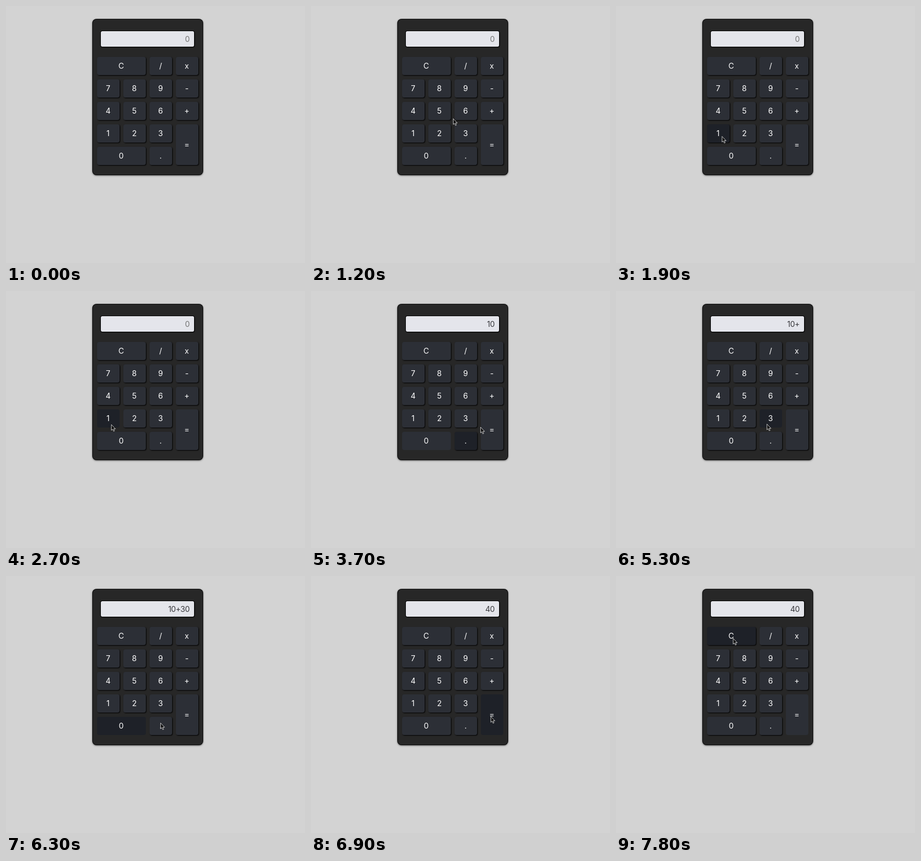
These frames come from a looping animation (558 by 480 pixels, 8000 ms). An HTML page:

```html
<!DOCTYPE html>
<html lang="en">
<head>
<meta charset="utf-8">
<title>Calculator</title>
<style>
html, body { margin: 0; width: 100%; height: 100%; overflow: hidden; background: #d3d3d3; }
body { position: relative; font: 14.3px Inter, Roboto, sans-serif; }
body * { position: absolute; box-sizing: border-box; }
#case { left: 162px; top: 25px; width: 204.5px; height: 290px; border-radius: 7px;
  background: #272727; box-shadow: 0 0 0 1px #0a0a0a, 0 1px 3px 1px #0008; }
#display { left: 177px; top: 47px; width: 174px; height: 29px; padding-right: 8.4px; border-radius: 3px;
  background: #e4e5eb; line-height: 29.5px; text-align: right; letter-spacing: -.4px;
  box-shadow: 0 0 0 1px #000, 1px 1px 2px #000; }
.key { width: 42px; height: 34px; padding-bottom: 1px; border-radius: 4px; color: #fff;
  display: flex; align-items: center; justify-content: center; }
#pointer { left: 0; top: 0; width: 12px; height: 16px; overflow: visible; }
</style>
</head>
<body>
<div id="case"></div>
<div id="display"></div>
<svg id="pointer"><path d="M.7 .5V11.2L3 9.1L4.8 13L6.5 12.3L4.9 8.5H8.2Z" fill="#111" stroke="#eee" stroke-width=".8"/></svg>
<script>
const LOOP = 8000, STEP = 100, LEFT = 169.5, TOP = 95, COL = 49, ROW = 42;
const display = document.getElementById("display");
const pointer = document.getElementById("pointer");

// A repeated character widens its key; "=" also spans two rows.
const layout = ["CC/x", "789-", "456+", "123=", "00."];
const keys = layout.flatMap((line, row) => [...new Set(line)].map(label => {
  const el = document.createElement("div");
  const x = LEFT + COL * line.indexOf(label), y = TOP + ROW * row;
  const w = COL * (line.split(label).length - 1) - 7;
  const h = ROW * (label === "=" ? 2 : 1) - 8;
  el.className = "key";
  el.textContent = label;
  Object.assign(el.style, { left: x + "px", top: y + "px", width: w + "px", height: h + "px" });
  document.body.insertBefore(el, pointer);
  return { el, label, x, y, w, h };
}));

// The pointer rests between curved moves, each bending towards a control point.
const entry = [415, 402], enter = 600;
const moves = [
  { start: enter, end: 1500, bend: [293, 141], to: [199, 231] },
  { start: 1700, end: 2000, bend: [198, 240], to: [196, 249] },
  { start: 2800, end: 3100, bend: [213, 266], to: [230, 284] },
  { start: 3300, end: 4100, bend: [348, 266], to: [337, 199] },
  { start: 4500, end: 5300, bend: [275, 272], to: [281, 248] },
  { start: 5600, end: 5900, bend: [255, 266], to: [230, 284] },
  { start: 6100, end: 6500, bend: [293, 275], to: [335, 262] },
  { start: 7300, end: 7800, bend: [208, 80], to: [218, 116] }
];
const presses = [["1", 2600], ["0", 3300], ["+", 4300], ["3", 5300], ["0", 6000], ["=", 6700]];
const RELEASE = 200;
const hoverFrom = moves[1].start;

function tip(t) {
  let from = entry;
  for (const { start, end, bend, to } of moves) {
    if (t < start) break;
    const u = Math.min(1, (t - start) / (end - start)), v = 1 - u;
    from = from.map((p, i) => v * v * p + 2 * u * v * bend[i] + u * u * to[i]);
  }
  return from;
}

function hovered(key, t) {
  const [x, y] = tip(t);
  return t >= hoverFrom && x >= key.x && x <= key.x + key.w && y >= key.y && y <= key.y + key.h;
}

function entered(t) {
  const sum = text => String(text.split("+").reduce((a, b) => a + Number(b), 0));
  return presses.filter(([, at]) => at + RELEASE <= t)
    .reduce((text, [label]) => label === "=" ? sum(text) : text + label, "");
}

function draw(t) {
  const [x, y] = tip(t);
  pointer.style.visibility = t < enter ? "hidden" : "visible";
  pointer.style.transform = `translate(${x}px, ${y}px)`;

  const text = entered(t);
  display.textContent = text || "0";
  display.style.color = text ? "#38383c" : "#757575";

  const focused = presses.filter(([, at]) => at <= t).pop()?.[0];
  for (const key of keys) {
    // the highlight trails the pointer slightly
    const dark = (hovered(key, t - STEP) + hovered(key, t - 2 * STEP)) / 2;
    key.el.style.background = `rgb(${[44, 47, 54].map(c => c - 14 * dark)})`;
    key.el.style.boxShadow = key.label === focused ? "none" : "1px 1px 2px #000";
  }
}

const begin = performance.now();
function frame() {
  const t = (performance.now() - begin) % LOOP;
  draw(Math.floor(t / STEP) * STEP);
  requestAnimationFrame(frame);
}
frame();
</script>
</body>
</html>
```
